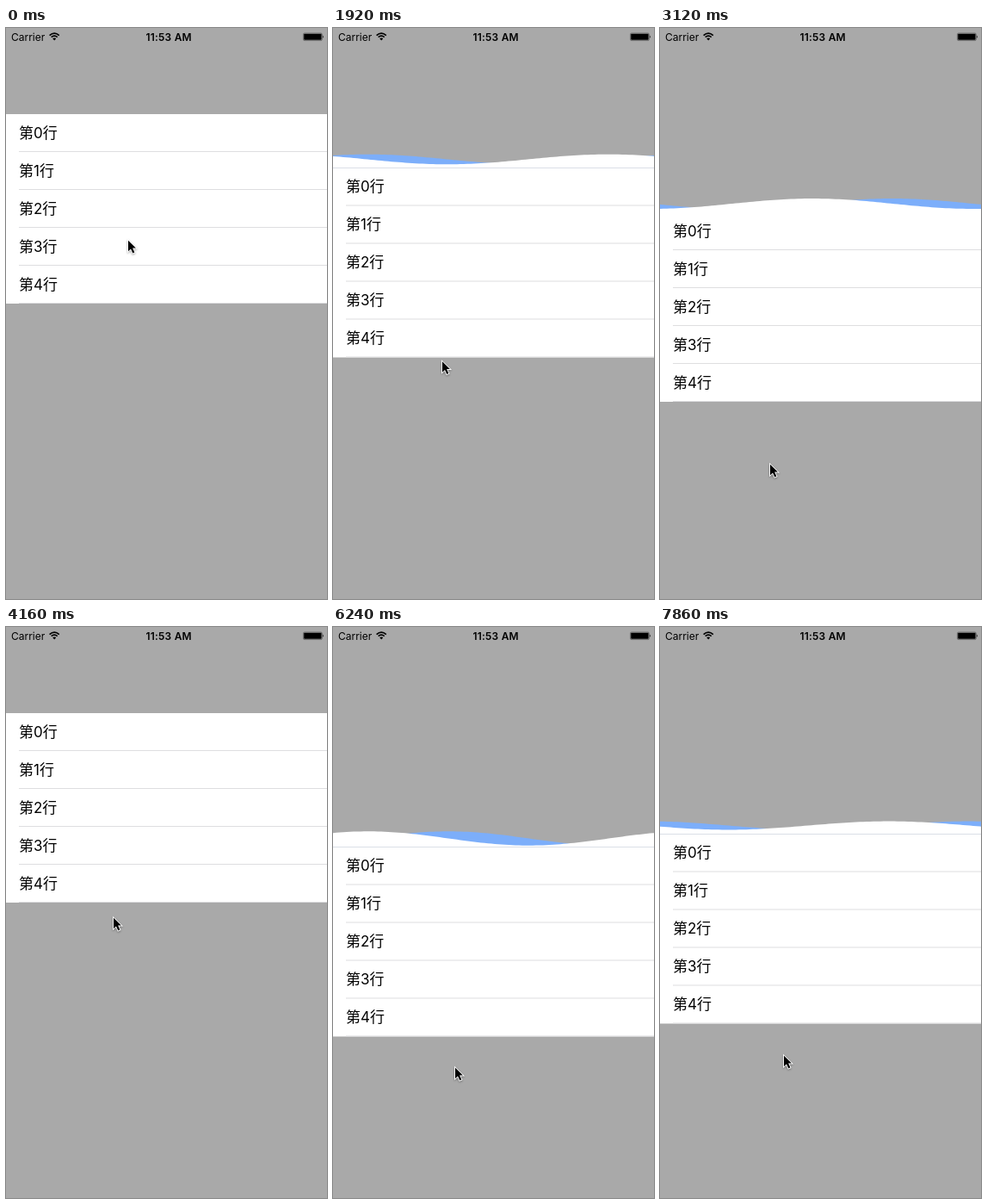
An HTML page that plays this animation: 373 by 663 pixels, repeating every 8 s.

```html
<!DOCTYPE html>
<html lang="zh-Hans">
<head>
<meta charset="utf-8">
<title>Wave pull to refresh</title>
<style>
  html, body { margin: 0; width: 100%; height: 100%; overflow: hidden; background: #a9a9a9; }
  svg { display: block; width: 100%; height: 100%; }
  text { font-family: Inter, 'Noto Sans CJK SC', 'Noto Sans CJK', 'Noto Sans', sans-serif; fill: #000; }
  .status { font-size: 12px; }
  .clock { font-weight: 600; text-anchor: middle; letter-spacing: .2px; }
  .row { font-size: 17px; }
  #cursor { filter: drop-shadow(0 1px 1px rgba(0, 0, 0, .35)); }
</style>
</head>
<body>
<svg viewBox="0 0 373 663">
  <defs><clipPath id="header"><rect id="headerBox" y="100" width="373" height="0"/></clipPath></defs>
  <rect width="373" height="663" fill="#a9a9a9"/>

  <text class="status" x="6" y="14.5">Carrier</text>
  <text class="status clock" x="189.2" y="14.5">11:53 AM</text>
  <g fill="none" stroke="#000" stroke-width="1.7">
    <path d="M50.6 8.6Q56.2 3.6 61.8 8.6"/>
    <path d="M52.7 10.7Q56.2 7.6 59.7 10.7"/>
  </g>
  <path d="M54.2 12.2Q56.2 10.6 58.2 12.2L56.2 14.4Z"/>
  <rect x="345.4" y="6" width="22" height="8.6" rx="1.6" fill="none" stroke="#000" stroke-opacity=".5" stroke-width=".7"/>
  <rect x="346.2" y="6.8" width="20.4" height="7" rx=".8"/>
  <path d="M368.3 8.6Q370 10.3 368.3 12Z"/>

  <g clip-path="url(#header)">
    <path id="backWave" fill="#7caefa"/>
    <path id="frontWave" fill="#fff"/>
  </g>
  <g id="list"><rect width="373" height="220" fill="#fff"/></g>
  <path id="cursor" d="M1 1.8V14.2L4 11.4L6.3 16.5L8.4 15.6L6.1 10.6H9.9Z"
        stroke="#fff" stroke-width="1.8" paint-order="stroke"/>
</svg>
<script>
const LOOP = 8000, START = 880, STEP = 148.3, LAST = 48;
const WIDTH = 373, HEIGHT = 663, REST = 100;
const $ = id => document.getElementById(id);
const clamp = v => Math.max(0, Math.min(1, v));

for (let i = 0; i < 5; i++) {
  $('list').insertAdjacentHTML('beforeend',
    `<text class="row" x="15" y="${i * 44 + 27.5}">第${i}行</text>
     <rect x="15" y="${i * 44 + 43}" width="358" height="1" fill="#dedee0"/>`);
}

// Hand movements in steps (one screen refresh each): from, to, dx, dy.
const moves = [
  [0, 8, -15, 140.5], [8, 15, 1, 119.5],
  [19, 23, -3, -169], [23, 26, 8, -205],
  [27, 29, 8, 375], [29, 35, 1, 4], [43, 48, 2, -14]
];
const pulls = [{ grab: 0, release: 18 }, { grab: 27, release: 47.78 }];

function pointer(step) {
  let x = 141, y = 245;
  for (const [from, to, dx, dy] of moves) {
    const part = clamp((step - from) / (to - from));
    x += dx * part;
    y += dy * part;
  }
  return { x, y };
}

// Scroll view resistance past its edge.
const rubberBand = distance => HEIGHT * (1 - 1 / (1 + 0.55 * distance / HEIGHT));

// Critically damped return after release.
const settle = t => (1 + 2 * t) * Math.exp(-2 * t);

function listTop(step) {
  const lag = 0.26, slack = 10;
  const { grab, release } = pulls.findLast(pull => pull.grab <= step);
  const distance = pointer(Math.min(step, release) - lag).y - pointer(grab).y - slack;
  const offset = rubberBand(Math.max(0, distance)) * settle(Math.max(0, step - release));
  return REST + Math.round(offset * 2) / 2;
}

// The waves run left, very slightly gaining speed.
function crest(step) {
  const t = step - 27.6;
  return -1873 - 113.2 * t - 0.068 * t * t;
}

// Amplitude swings linearly between 4 and 12.
function amplitude(step) {
  const half = 17.1, phase = (step - 11.8 + 4 * half) % (2 * half);
  return 4 + 8 * (1 - Math.abs(phase / half - 1));
}

function wave(peak, top, height) {
  let d = `M0 ${top}`;
  for (let x = 0; x <= WIDTH + 3; x += 4) {
    const y = top - 10 - height * Math.cos((x - peak) / WIDTH * 2 * Math.PI);
    d += `L${x} ${y.toFixed(2)}`;
  }
  return d + `V${top}Z`;
}

function render(time) {
  const step = time < START ? 0 : Math.min(LAST, 1 + Math.floor((time - START) / STEP));
  const top = listTop(step), peak = crest(step), height = amplitude(step);
  const { x, y } = pointer(step);
  $('headerBox').setAttribute('height', top - REST);
  $('backWave').setAttribute('d', wave(peak + WIDTH / 4, top, height));
  $('frontWave').setAttribute('d', wave(peak, top, height));
  $('list').setAttribute('transform', `translate(0 ${top})`);
  $('cursor').setAttribute('transform', `translate(${x} ${y})`);
}

const begin = performance.now();
function tick() {
  render((performance.now() - begin) % LOOP);
  requestAnimationFrame(tick);
}
tick();
</script>
</body>
</html>
```
